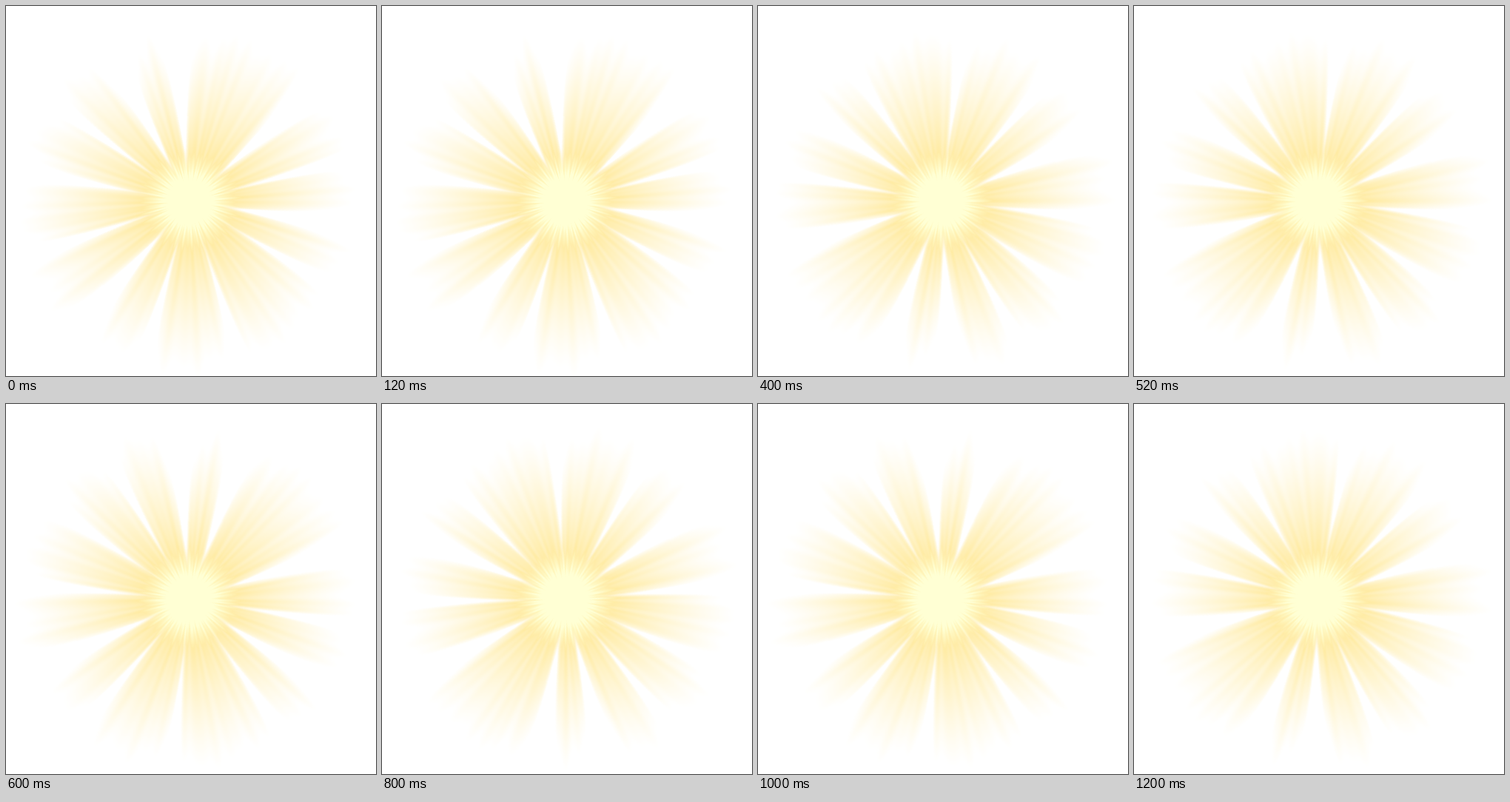
These frames come from a looping animation (500 by 500 pixels, 1.4 s). An HTML page with a canvas:

```html
<!DOCTYPE html>
<html lang="en">
<head>
<meta charset="utf-8">
<title>Sunburst</title>
<style>
html, body { margin: 0; width: 100%; height: 100%; overflow: hidden; background: #fff; }
canvas { display: block; }
</style>
</head>
<body>
<canvas id="stage" width="500" height="500"></canvas>
<script>
const SIZE = 500, MID = SIZE / 2, CX = 248, CY = 264, HOLD = 200;

// One burst, jumping to a new turn (in degrees) at every step.
const TURNS = [0, 33, 205, 24, 194, 24, 209];

// Angles of the dark gaps between the rays, clockwise from the right.
const WIDE = [9, 131, 242, 265, 318];
const NARROW = [31, 72, 106, 161, 190, 216, 345];

const clamp = x => Math.max(0, Math.min(1, x));
const mix = (a, b, t) => a + (b - a) * t;

function ripple(angle, low, high) {
  let sum = 0;
  for (let k = low; k <= high; k += 4) sum += Math.sin(k * angle + k * k * 1.3);
  return sum / Math.sqrt((high - low) / 4 + 1);
}

function gapDepth(deg, centers, width) {
  return Math.max(...centers.map(center => {
    const away = Math.abs((deg - center + 540) % 360 - 180);
    return Math.exp(-((away / width) ** 2));
  }));
}

function makeBurst() {
  const canvas = new OffscreenCanvas(SIZE, SIZE);
  const ctx = canvas.getContext("2d");
  const picture = ctx.createImageData(SIZE, SIZE);
  const profile = Array.from({ length: 1440 }, (_, i) => {
    const deg = i / 4, angle = deg * Math.PI / 180;
    const fine = ripple(angle, 23, 83);
    const depth = Math.max(gapDepth(deg, WIDE, 4.5), 0.8 * gapDepth(deg, NARROW, 2.5));
    const reach = 222 + 8 * ripple(angle, 5, 25) + 8 * fine;
    return { reach: mix(reach, 74, depth), fine };
  });

  for (let y = 0; y < SIZE; y++) {
    for (let x = 0; x < SIZE; x++) {
      const dx = x + 0.5 - MID, dy = y + 0.5 - MID, r = Math.hypot(dx, dy);
      const turn = Math.atan2(dy, dx) / (2 * Math.PI) + 1;
      const { reach, fine } = profile[Math.floor(turn * 1440) % 1440];
      const rim = clamp((r - 36 - 6 * fine) / 26);
      const fade = clamp((reach - r) / (reach - 42));
      const alpha = r < 42 ? 1 : fade ** 1.25 * (1 + 0.08 * fine * rim);
      picture.data.set([255, mix(255, 233, rim), mix(212, 154, rim), 255 * clamp(alpha)],
        (y * SIZE + x) * 4);
    }
  }
  ctx.putImageData(picture, 0, 0);
  return canvas;
}

const ctx = document.getElementById("stage").getContext("2d");
const burst = makeBurst();

function draw() {
  const step = Math.floor(performance.now() / HOLD) % TURNS.length;
  ctx.clearRect(0, 0, SIZE, SIZE);
  ctx.save();
  ctx.translate(CX, CY);
  ctx.rotate(TURNS[step] * Math.PI / 180);
  ctx.drawImage(burst, -MID, -MID);
  ctx.restore();
  requestAnimationFrame(draw);
}
draw();
</script>
</body>
</html>
```
